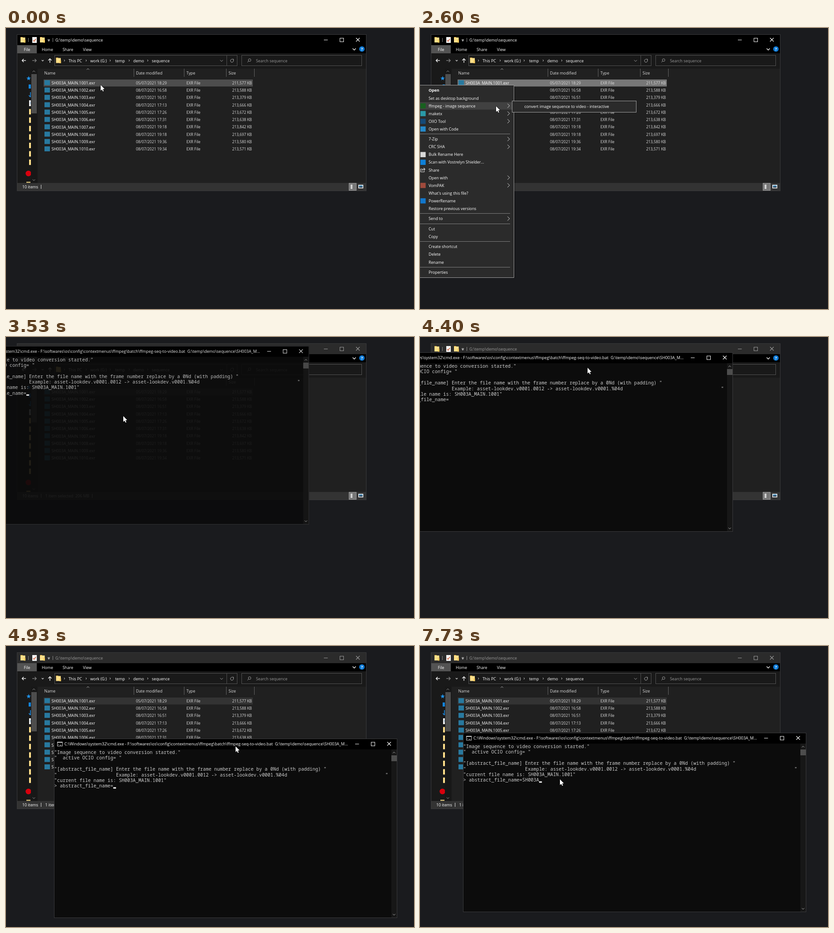
Recreate the animation shown at these times as an HTML page with a canvas. Size 901 by 622 pixels, loop 8 s.

```html
<!DOCTYPE html>
<html lang="en">
<head>
<meta charset="utf-8">
<title>Sequence to video</title>
<style>
  html, body { margin: 0; width: 100%; height: 100%; overflow: hidden; background: #1a1b1e; }
  canvas { display: block; }
</style>
</head>
<body>
<canvas id="stage" width="901" height="622"></canvas>
<script>
const ctx = document.getElementById('stage').getContext('2d');
const LOOP = 8000, FPS = 15;
const UI = '"Open Sans", "Noto Sans", sans-serif';
const MONO = '"Noto Sans Mono", "DejaVu Sans Mono", monospace';
const CHAR = 6.2, LINE = 12.4;

// ---------- drawing helpers ----------
function box(color, x, y, w, h) {
  ctx.fillStyle = color;
  ctx.fillRect(x, y, w, h);
}
function frame(color, x, y, w, h) {
  ctx.strokeStyle = color;
  ctx.lineWidth = 1;
  ctx.strokeRect(x + .5, y + .5, w - 1, h - 1);
}
function line(color, width, ...p) {
  ctx.strokeStyle = color;
  ctx.lineWidth = width;
  ctx.beginPath();
  for (let i = 0; i < p.length; i += 2) ctx.lineTo(p[i], p[i + 1]);
  ctx.stroke();
}
function dot(color, x, y, r) {
  ctx.fillStyle = color;
  ctx.beginPath();
  ctx.arc(x, y, r, 0, 7);
  ctx.fill();
}
function shape(color, ...p) {
  ctx.fillStyle = color;
  ctx.beginPath();
  for (let i = 0; i < p.length; i += 2) ctx.lineTo(p[i], p[i + 1]);
  ctx.closePath();
  ctx.fill();
}
// y is the middle of the capitals
function text(s, x, y, { color = '#fff', size = 8.8, align = 'left', weight = 400 } = {}) {
  ctx.font = `${weight} ${size}px ${UI}`;
  ctx.textAlign = align;
  ctx.fillStyle = color;
  ctx.fillText(s, x, y + size * .357);
}
const chevronV = (x, y, w, h, color, width = 1) =>
  line(color, width, x - w, y - h / 2, x, y + h / 2, x + w, y - h / 2);
const chevronH = (x, y, w, h, color) =>
  line(color, 1, x - w / 2, y - h, x + w / 2, y, x - w / 2, y + h);

function folder(x, y) {
  box('#e0b040', x, y, 5, 3);
  box('#ffe08a', x, y + 1, 10.5, 11);
  box('#f5cc60', x + 7.5, y + 6, 3.5, 6.5);
}
function windowButtons(min, max, close, y, color) {
  line(color, 1, min - 4, y + .5, min + 4.5, y + .5);
  frame(color, max - 4, y - 4, 9, 9);
  line(color, 1.1, close - 4, y - 4, close + 4, y + 4);
  line(color, 1.1, close + 4, y - 4, close - 4, y + 4);
}

// ---------- file explorer ----------
const files = [
  ['05/07/2021 18:29', '211,577'], ['08/07/2021 16:58', '213,588'],
  ['08/07/2021 16:51', '213,379'], ['08/07/2021 17:13', '213,666'],
  ['08/07/2021 17:26', '213,672'], ['08/07/2021 17:31', '213,638'],
  ['08/07/2021 19:18', '213,842'], ['08/07/2021 19:18', '213,697'],
  ['08/07/2021 19:36', '213,580'], ['08/07/2021 19:34', '213,571'],
];

function drawTitleBar(active) {
  const color = active ? '#fff' : '#999';
  box(active ? '#000' : '#2b2b2b', 25, 15, 770, 23);
  folder(32, 20);
  line('#888', 1, 49.5, 22, 49.5, 31);
  box('#f4f4f4', 58, 20, 10, 13);
  line('#d0603a', 1.4, 60, 27, 62, 29.5, 66, 24);
  folder(75, 20);
  line('#ddd', 1, 92, 25.5, 97, 25.5);
  shape('#ddd', 92, 27, 97, 27, 94.5, 29.8);
  line('#888', 1, 103.5, 22, 103.5, 31);
  text('G:\\temp\\demo\\sequence', 109, 26.5, { color, size: 8.95 });
  windowButtons(706, 741, 777, 26, color);
}

function drawRibbon() {
  box('#000', 25, 38, 770, 18);
  box('#535353', 25, 38, 43, 18);
  text('File', 46.5, 47.5, { align: 'center' });
  text('Home', 79, 47.5);
  text('Share', 125, 47.5);
  text('View', 170, 47.5);
  chevronV(769, 47, 3.5, 3.5, '#ddd', 1.6);
  dot('#0f7bd7', 786, 46.5, 6);
  text('?', 786, 46.5, { align: 'center', weight: 700 });
}

function drawAddressBar() {
  box('#191919', 25, 56, 770, 34);
  line('#fff', 1.3, 44, 72, 35.5, 72);
  line('#fff', 1.3, 39, 68.5, 35.5, 72, 39, 75.5);
  line('#888', 1.3, 58, 72, 67, 72);
  line('#888', 1.3, 63.5, 68.5, 67, 72, 63.5, 75.5);
  chevronV(81, 72, 2.2, 2.2, '#ddd', 1.2);
  line('#fff', 1.3, 97, 77, 97, 68);
  line('#fff', 1.3, 93.3, 71.7, 97, 68, 100.7, 71.7);
  frame('#535353', 107, 60, 404, 24);
  folder(110.5, 65.5);
  for (const x of [129, 177, 230, 272, 313]) chevronH(x, 72, 2, 2, '#ccc');
  [['This PC', 138], ['work (G:)', 186], ['temp', 241], ['demo', 281], ['sequence', 322]]
    .forEach(([s, x]) => text(s, x, 72.5));
  chevronV(476, 72.5, 3.2, 3.2, '#999');
  line('#535353', 1, 487.5, 61, 487.5, 84);
  ctx.strokeStyle = '#aaa';
  ctx.beginPath();
  ctx.arc(499, 72.5, 3.4, -.4, 4.9);
  ctx.stroke();
  line('#aaa', 1, 499.5, 69, 502.5, 69, 502.5, 72);
  frame('#535353', 520, 60, 266, 24);
  ctx.strokeStyle = '#999';
  ctx.beginPath();
  ctx.arc(538, 71, 2.9, 0, 7);
  ctx.stroke();
  line('#999', 1, 536, 73, 533, 76);
  text('Search sequence', 552, 72.5, { color: '#999' });
}

function drawSidebar() {
  box('#191919', 25, 90, 45, 253);
  ctx.save();
  ctx.beginPath();
  ctx.rect(25, 90, 30, 252.5);
  ctx.clip();
  const star = [];
  for (let i = 0; i < 10; i++) {
    const r = i % 2 ? 2.2 : 5.2, a = i * Math.PI / 5 - Math.PI / 2;
    star.push(50 + r * Math.cos(a), 111.5 + r * Math.sin(a));
  }
  shape('#1e90e8', ...star);
  box('#1284dc', 50, 125, 6, 9);
  line('#2090e8', 1.6, 54, 142, 54, 153);
  line('#2090e8', 1.6, 50.5, 149, 54, 153);
  box('#f0f0f0', 51, 160, 5, 13);
  box('#4b87b5', 53, 164, 3, 1);
  box('#4b87b5', 53, 167, 3, 1);
  for (let i = 0; i < 7; i++) box('#ffe08a', 51, 179.3 + i * 18.65, 4, 12);
  box('#ffe08a', 45, 340.5, 9, 3);
  dot('#d9000d', 49.5, 322, 6.2);
  ctx.restore();
  box('#171717', 55, 90, 13, 253);
  box('#4d4d4d', 56, 102, 12, 87);
  chevronV(61.5, 96, 2.8, -2.8, '#999');
  chevronV(61.5, 336.5, 2.8, 2.8, '#999');
}

function drawFileList(rowColor) {
  box('#202020', 70, 90, 725, 253);
  chevronV(181, 91, 2.8, -2.5, '#aaa');
  for (const x of [282, 393, 486, 548]) box('#636363', x, 90, 1, 18);
  [['Name', 84.5], ['Date modified', 287], ['Type', 398.5], ['Size', 491.5]]
    .forEach(([s, x]) => text(s, x, 99.5, { color: '#dedede' }));
  box(rowColor, 83, 114, 462, 15.5);
  files.forEach(([date, size], i) => {
    const y = 121.7 + i * 16.28, dim = { color: '#dedede', size: 8.4 };
    box('#28799f', 85, y - 6.2, 12, 11);
    text(`SH003A_MAIN.${1001 + i}.exr`, 100.5, y);
    text(date, 287, y, dim);
    text('EXR File', 398.5, y, { color: '#dedede', size: 8.6 });
    text(size + ' KB', 543, y, { ...dim, align: 'right' });
  });
}

function drawStatusBar(selected) {
  box('#333', 25, 343, 770, 17);
  text('10 items', 36, 352);
  box('#ddd', 77, 347, 1, 9);
  if (selected) {
    text('1 item selected  206 MB', 86.5, 352);
    box('#ddd', 190, 347, 1, 9);
  }
  box('#777', 757, 343, 17, 17);
  frame('#999', 757, 343, 17, 17);
  for (let i = 0; i < 3; i++) box('#fff', 761, 347 + i * 3.2, 4, 2.2);
  box('#f0f0f0', 778, 347, 11, 8);
  box('#3a86b8', 779.5, 348.5, 8, 2.5);
  box('#345', 779.5, 351, 8, 2.5);
}

function drawExplorer(t) {
  const active = t < 3330;
  const rowColor = t < 730 ? '#4d4d4d' : t < 800 ? '#626262' : active ? '#777' : '#333';
  drawTitleBar(active);
  drawRibbon();
  drawAddressBar();
  drawSidebar();
  drawFileList(rowColor);
  drawStatusBar(t >= 860);
  frame('#3a3a3c', 24, 14, 772, 347);
}

// ---------- context menu: label, icon colour, '>' marks a submenu, null a separator ----------
const menu = [
  ['Open'], ['Set as desktop background'], ['ffmpeg - image sequence', '#17601f', '>'],
  ['maketx', '#2a9aa8', '>'], ['OIIO Tool', '#164a78', '>'], ['Open with Code', '#2489ca'], null,
  ['7-Zip', '', '>'], ['CRC SHA', '', '>'], ['Bulk Rename Here', '#d8d8d8'],
  ['Scan with Vostrelyn Shielder...', '#0f80d8'], ['Share', 'share'], ['Open with', '', '>'],
  ['VomPAK', '#a04a3c', '>'], ["What's using this file?"], ['PowerRename', '#1277cc'],
  ['Restore previous versions'], null, ['Send to', '', '>'], null, ['Cut'], ['Copy'], null,
  ['Create shortcut'], ['Delete'], ['Rename'], null, ['Properties'],
];
const ITEM = 17.07, GAP = 5.4;

function drawMenu(cursor, pinned) {
  box('rgba(0,0,0,.3)', 208, 129, 2, 424);
  box('#2b2b2b', 0, 126, 208, 427);
  line('#a0a0a0', 1, 0, 126.5, 207.5, 126.5, 207.5, 552.5, 0, 552.5);
  let y = 138;
  menu.forEach((item, i) => {
    if (!item) {
      box('#808080', 0, Math.round(y - ITEM / 2 + GAP / 2 - .5), 199, 1);
      y += GAP;
      return;
    }
    const [label, icon, arrow] = item;
    const hit = cursor.x < 204 && Math.abs(cursor.y - y) < ITEM / 2;
    if (pinned ? i === 2 : hit) box('#414141', 0, y - 8, 204, 16.5);
    if (icon === 'share') {
      line('#ddd', 1, 5, y - 2, 1.5, y - 2, 1.5, y + 4.5, 9.5, y + 4.5, 9.5, y + 2);
      line('#ddd', 1.2, 4, y + 2, 6, y - 1.5, 11, y - 1.5);
      line('#ddd', 1.2, 8, y - 4.5, 11, y - 1.5, 8, y + 1.5);
    } else if (icon) box(icon, 1, y - 5.5, 11.5, 11.5);
    text(label, 19, y + .3, { weight: i ? 400 : 700 });
    if (arrow) chevronH(195.5, y, 4.5, 4.5, '#ddd');
    y += ITEM;
  });
}

function drawSubmenu(cursor) {
  box('#2b2b2b', 203, 161, 275, 26);
  frame('#a0a0a0', 203, 161, 275, 26);
  if (cursor.x > 205) box('#414141', 206, 165, 269, 18);
  text('convert image sequence to video - interactive', 230.5, 174, { size: 8.88 });
}

// ---------- console ----------
const titleHead = String.raw`C:\Windows\system32\cmd.exe - F:\softwares\os\config\contextmenus\ffmpeg\batch\ffmpeg-seq-to-video.bat  G:\temp\demo\sequence` + '\\';
const example = '"' + ' '.repeat(21) + 'Example: asset-lookdev.v0001.0012 -> asset-lookdev.v0001.%04d';
const consoleLines = [
  '"Image sequence to video conversion started."',
  '"  active OCIO config= "',
  '',
  '"[abstract_file_name] Enter the file name with the frame number replace by a 0Nd (with padding) "',
  example.padEnd(118) + '"',
  '"current file name is: SH003A_MAIN.1001"',
];
const prompt = '> abstract_file_name=';
const keyTimes = [6600, 6730, 7000, 7270, 7470, 7730];

function drawConsole(t, pos, alpha) {
  const w = 758, h = 397, scale = 1 - (1 - alpha) * .05;
  ctx.save();
  ctx.globalAlpha = alpha;
  ctx.translate(pos.x + w / 2, pos.y + h / 2);
  ctx.scale(scale, scale);
  ctx.translate(-w / 2, -h / 2);

  box('#0c0c0c', 0, 0, w, h);
  box('#000', 0, 0, w, 24);
  box('#000', 7, 7, 12, 10);
  frame('#ccc', 7, 7, 12, 10);
  box('#ccc', 7, 7, 12, 2);
  line('#ccc', 1, 9, 12.5, 11, 13.5);
  line('#ccc', 1, 13, 14.5, 16, 14.5);
  const selecting = t >= 6000 && t < 6460;
  text(selecting ? `Select ${titleHead}SH0...` : `${titleHead}SH003A_M...`, 23, 12, { size: 9.02 });
  windowButtons(669, 704, 740, 11.5, '#fff');

  box('#171717', 745, 24, 12, h - 25);
  box('#4d4d4d', 745, 37, 12, 13);
  chevronV(751, 31, 2.8, -2.8, '#aaa');
  chevronV(751, 389.5, 2.8, 2.8, '#aaa');

  if (t >= 3400) {
    const typed = 'SH003A'.slice(0, keyTimes.filter(k => t >= k).length);
    const last = prompt + typed;
    ctx.font = `${CHAR / .6}px ${MONO}`;
    ctx.textAlign = 'left';
    ctx.fillStyle = '#ccc';
    [...consoleLines, last].forEach((s, i) => ctx.fillText(s, .6, 34 + i * LINE));
    if (t < 4000 || t >= 4530) box('#f2f2f2', .6 + last.length * CHAR, 107.6, CHAR, 3);
    if (selecting) box('#f2f2f2', .6 + 34 * CHAR, 99, CHAR, LINE);
  }
  frame('#3a3a3c', 0, 0, w, h);
  ctx.restore();
}

// ---------- motion ----------
const pointerPath = [
  [0, 209, 126], [1800, 209, 126], [2267, 168, 173], [2600, 168, 173], [3000, 259, 175],
  [3733, 259, 175], [4067, 315, 40], [4133, 314, 37], [4333, 314, 37],
  [4400, 370, 68], [4533, 450, 130], [4667, 505, 180], [4800, 531, 212],
  [4933, 507, 222], [5067, 500, 222], [5200, 500, 222], [5267, 486, 201],
  [5333, 496, 209], [5400, 496, 209], [5867, 309, 295], [LOOP, 309, 295],
];
function pointerAt(t) {
  const i = pointerPath.findIndex(k => k[0] > t);
  const [t0, x0, y0] = pointerPath[i - 1], [t1, x1, y1] = pointerPath[i];
  const p = (t - t0) / (t1 - t0), e = p * p * (3 - 2 * p);
  return { x: Math.round(x0 + (x1 - x0) * e), y: Math.round(y0 + (y1 - y0) * e) };
}
function consoleAt(t, pointer) {
  if (t < 4395) return { x: -87, y: 19 };
  if (t < 4460) return { x: -67, y: 34 };
  if (t < 5395) return { x: pointer.x - 401, y: pointer.y - 17 };
  return { x: 95, y: 192 };
}
// opacity that climbs through the given values, one per tick
function fade(t, start, values) {
  const i = Math.floor((t - start + 5) * FPS / 1000);
  return i < 0 ? 0 : values[i] ?? 1;
}

function drawPointer({ x, y }) {
  ctx.save();
  ctx.translate(x, y);
  ctx.lineJoin = 'round';
  const outline = [0, 0, 0, 12.8, 2.9, 10.2, 5, 14.6, 6.9, 13.8, 4.9, 9.4, 8.7, 9.1, 0, 0];
  line('#000', 1.2, ...outline);
  shape('#fff', ...outline);
  ctx.restore();
}

function draw(t) {
  const pointer = pointerAt(t);
  box('#1a1b1e', 0, 0, 901, 622);
  drawExplorer(t);
  if (t < 3260) {
    ctx.globalAlpha = fade(t, 1467, [.4, .8]);
    if (ctx.globalAlpha) drawMenu(pointer, t >= 2460);
    ctx.globalAlpha = fade(t, 2467, [.5]);
    if (ctx.globalAlpha) drawSubmenu(pointer);
    ctx.globalAlpha = 1;
  }
  const alpha = fade(t, 3333, [.15, .45, .75, .91, .98]);
  if (alpha) drawConsole(t, consoleAt(t, pointer), alpha);
  drawPointer(pointer);
}

let start = null, shown = -1;
function tick(now) {
  start ??= now;
  const step = Math.floor(((now - start) % LOOP + 5) * FPS / 1000);
  if (step !== shown) {
    shown = step;
    draw(step * 1000 / FPS % LOOP);
  }
  requestAnimationFrame(tick);
}
draw(0);
requestAnimationFrame(tick);
</script>
</body>
</html>
```
